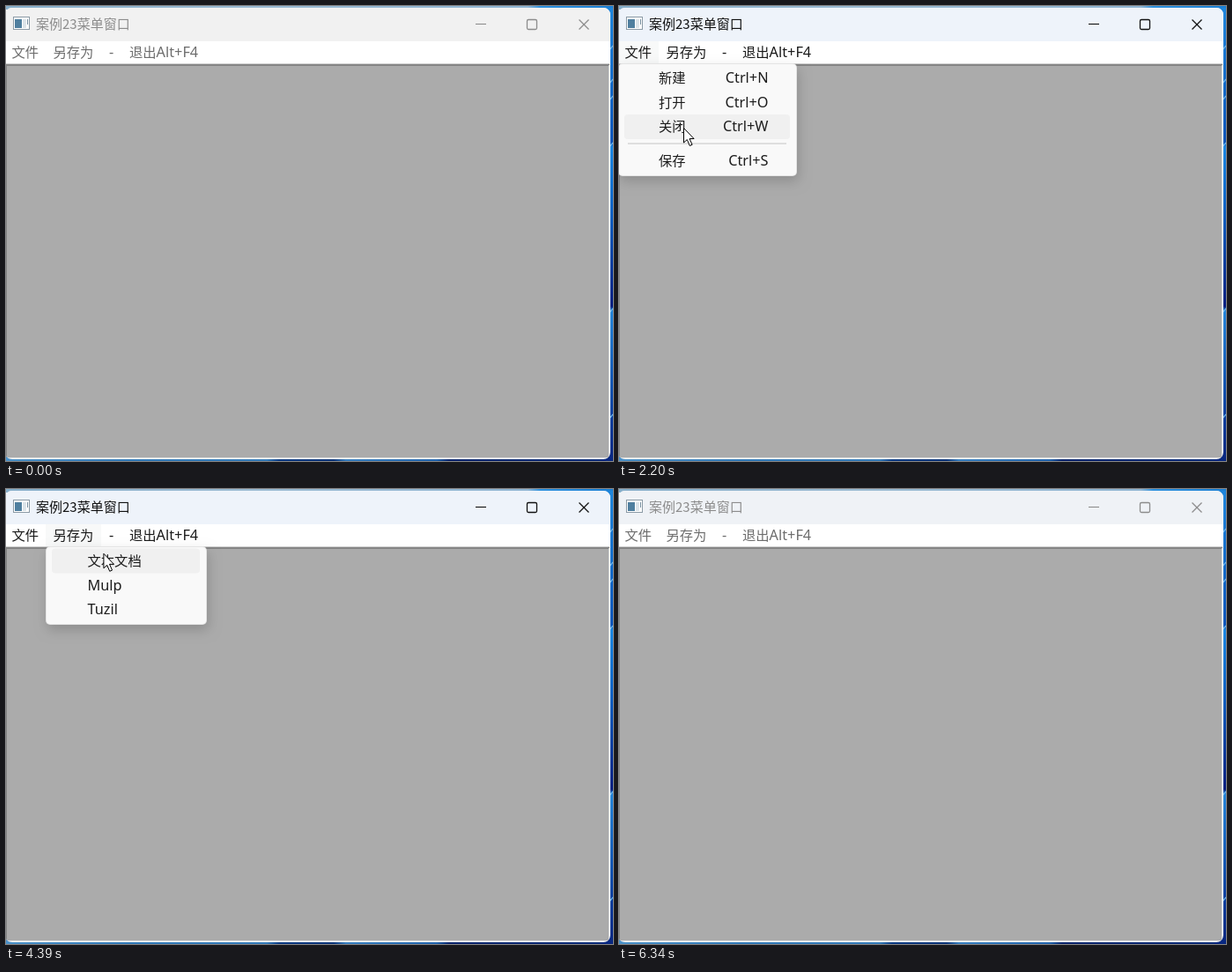
Write an HTML page with a canvas that moves like this. It is 689x516 px and loops after 6.4 s.

```html
<!DOCTYPE html>
<html lang="zh-CN">
<head>
<meta charset="utf-8">
<title>菜单窗口</title>
<style>
html, body { margin: 0; width: 100%; height: 100%; overflow: hidden; }
canvas { display: block; }
</style>
</head>
<body>
<canvas id="stage" width="689" height="516"></canvas>
<script>
const ctx = document.getElementById('stage').getContext('2d');
const LOOP = 6400;
const CJK = '"Noto Sans CJK SC", "Noto Sans CJK", sans-serif';
const LATIN = '"Noto Sans", "Open Sans", sans-serif';

// time, x, y of the pointer tip
const PATH = [
  [70, 571, 491], [680, 14, 46], [750, 13, 44], [1360, 13, 44],
  [2060, 73, 125], [2200, 73, 138], [2270, 73, 138], [2550, 74, 178],
  [2880, 74, 178], [3490, 61, 45], [3560, 61, 40], [3620, 61, 40],
  [3640, 61, 35], [3850, 61, 35], [4460, 112, 74], [4740, 123, 143],
  [4800, 123, 143], [4990, 151, 63], [5060, 151, 63], [5120, 152, 47],
  [5190, 154, 46], [5790, 616, 482], [5850, 617, 483], [5980, 645, 516]
];

const BAR = [
  { label: '文件', x: 6.5, left: 0, right: 45 },
  { label: '另存为', x: 53.5, left: 45, right: 108 },
  { label: '-', x: 117, left: 108, right: 131 },
  { label: '退出', tail: 'Alt+F4', x: 140, left: 131, right: 225 }
];

const MENUS = [
  {
    x: -1, w: 203, h: 128, from: 930, to: 3290, textX: 45, separator: 156,
    rows: [['新建', 81, 'Ctrl+N'], ['打开', 109, 'Ctrl+O'], ['关闭', 136.5, 'Ctrl+W'], ['保存', 175, 'Ctrl+S']]
  },
  {
    x: 45, w: 183, h: 89, from: 3360, to: 5080, textX: 92.5,
    rows: [['文本文档', 81], ['Mulp', 109], ['Tuzil', 136.5]]
  }
];

const clamp = v => Math.max(0, Math.min(1, v));
const mix = (a, b, k) => a + (b - a) * k;

function rect(x, y, w, h, color) {
  ctx.fillStyle = color;
  ctx.fillRect(x, y, w, h);
}

function roundBox(x, y, w, h, r, color) {
  ctx.beginPath();
  ctx.roundRect(x, y, w, h, r);
  ctx.fillStyle = color;
  ctx.fill();
}

function line(points, color, width) {
  ctx.beginPath();
  points.forEach(([x, y]) => ctx.lineTo(x, y));
  ctx.strokeStyle = color;
  ctx.lineWidth = width;
  ctx.stroke();
}

function text(str, x, middle, color, { align = 'left', size = 15.3 } = {}) {
  const latin = /^[\x20-\x7e]+$/.test(str);
  ctx.font = latin ? `${size + 1}px ${LATIN}` : `${size}px ${CJK}`;
  ctx.textAlign = align;
  ctx.fillStyle = color;
  ctx.fillText(str, x, middle + 5.5);
}

function pointerAt(t) {
  if (t < PATH[0][0] || t > PATH[PATH.length - 1][0]) return null;
  const i = Math.max(1, PATH.findIndex(p => p[0] >= t));
  const [t0, x0, y0] = PATH[i - 1], [t1, x1, y1] = PATH[i];
  const k = (1 - Math.cos(Math.PI * (t - t0) / (t1 - t0))) / 2;
  return { x: mix(x0, x1, k), y: mix(y0, y1, k) };
}

function gradient(x1, y1, stops) {
  const g = ctx.createLinearGradient(0, 0, x1, y1);
  stops.forEach(([at, color]) => g.addColorStop(at, color));
  return g;
}

function drawDesktop() {
  rect(0, 0, 689, 4, gradient(689, 0, [[0, '#86aeca'], [0.4, '#9bbbd3'], [0.86, '#8fb5d3'], [0.88, '#2d91df'], [1, '#1b7fd4']]));
  rect(676, 2, 13, 514, gradient(0, 516, [[0, '#1f86dc'], [0.3, '#0a55ba'], [0.31, '#1b87e2'], [0.45, '#0d62c4'], [0.66, '#041f80'], [0.67, '#2585d9'], [0.9, '#0b3f9f'], [1, '#07267f']]));
  rect(0, 504, 676, 12, gradient(689, 0, [[0, '#4a91c8'], [0.2, '#3179b8'], [0.43, '#347bb9'], [0.45, '#0b3a83'], [0.54, '#0c3478'], [0.56, '#377fc0'], [0.71, '#2164ad'], [0.73, '#08246c'], [1, '#0a2d7b']]));
  for (const y of [48, 86, 105, 158, 346, 466]) line([[684, y + 3], [689, y - 3]], '#6fb8ef', 1.2);
}

function drawWindow(t, pointer, open) {
  const active = t >= 890 && t < 6240;
  const tint = active ? clamp((t - 820) / 400) : t >= 6240 ? 0.6 : 0;
  const ink = active ? '#111' : '#8c8c8c';
  const barInk = active ? '#1a1a1a' : '#6d6d6d';

  roundBox(-1, 2, 687, 512, 8, '#f5f5f5');
  ctx.save();
  ctx.clip();
  rect(-1, 2, 687, 38, `rgb(${mix(241, 238, tint)},${mix(241, 243, tint)},${mix(241, 250, tint)})`);
  rect(-1, 40, 687, 26, '#fff');
  rect(0, 65, 685, 1, '#cfcfcf');
  rect(0, 66, 685, 1, '#858585');
  rect(0, 67, 685, 1, '#858585');
  rect(0, 68, 684, 444, '#ababab');
  rect(0, 66, 1, 446, '#858585');
  rect(684, 67, 1, 446, '#e3e3e3');
  rect(0, 512, 685, 1, '#e3e3e3');
  ctx.restore();

  rect(8, 12, 19, 15, '#8b9aa5');
  rect(9, 13, 17, 13, '#fff');
  rect(10, 15, 8, 10, '#4f7f9f');
  rect(19, 15, 4, 10, '#dce4e9');
  rect(24, 15, 1, 6, '#7890a0');
  text('案例23菜单窗口', 34, 20.5, ink, { size: 15 });

  line([[533, 20.5], [545, 20.5]], ink, 1.1);
  ctx.beginPath();
  ctx.roundRect(591.5, 15.5, 11, 11, 1.5);
  ctx.lineWidth = 1.3;
  ctx.stroke();
  line([[650.5, 15.5], [661.5, 26.5]], ink, 1.2);
  line([[661.5, 15.5], [650.5, 26.5]], ink, 1.2);

  const openIndex = MENUS.indexOf(open);
  BAR.forEach((item, i) => {
    const over = pointer && pointer.y >= 40 && pointer.y < 65 && pointer.x >= item.left && pointer.x < item.right;
    if (open ? i === openIndex : over) rect(item.left, 40, item.right - item.left, 25, '#f8f9f9');
    text(item.label, item.x, 52, barInk);
    if (item.tail) text(item.tail, item.x + 30.6, 52, barInk);
  });
}

function drawMenu(menu, t, pointer) {
  const age = t - menu.from;
  ctx.globalAlpha = age < 120 ? 0.24 : age < 165 ? 0.75 : 1;
  ctx.shadowColor = 'rgba(0,0,0,.17)';
  ctx.shadowBlur = 14;
  ctx.shadowOffsetX = 2;
  ctx.shadowOffsetY = 6;
  roundBox(menu.x, 65, menu.w, menu.h, 5, '#e4e4e4');
  ctx.shadowColor = 'transparent';
  roundBox(menu.x + 1, 66, menu.w - 2, menu.h - 2, 4, age < 400 && menu === MENUS[0] ? '#f6f6f6' : '#f9f9f9');
  if (menu.separator) rect(10, menu.separator - 1, 180, 2, '#dedede');

  for (const [label, y, shortcut] of menu.rows) {
    const over = pointer && Math.abs(pointer.y - y) < 13.8 && pointer.x > menu.x && pointer.x < menu.x + menu.w;
    if (over) roundBox(menu.x + 7, y - 13.5, menu.w - 15, 28, 4, '#f0f0f0');
    text(label, menu.textX, y, '#1c1c1c');
    if (shortcut) text(shortcut, 169.5, y, '#1c1c1c', { align: 'right' });
  }
  ctx.globalAlpha = 1;
}

function drawPointer({ x, y }) {
  ctx.save();
  ctx.translate(x + 0.5, y + 0.5);
  ctx.beginPath();
  [[0, 0], [0, 16.5], [3.8, 13], [6.8, 20], [9.6, 18.8], [6.6, 12], [11.6, 12]]
    .forEach(([px, py]) => ctx.lineTo(px, py));
  ctx.closePath();
  ctx.fillStyle = '#fff';
  ctx.fill();
  ctx.strokeStyle = '#000';
  ctx.lineWidth = 1;
  ctx.stroke();
  ctx.restore();
}

function draw(t) {
  const pointer = pointerAt(t);
  const open = MENUS.find(m => t >= m.from && t < m.to);
  drawDesktop();
  drawWindow(t, pointer, open);
  if (open) drawMenu(open, t, pointer);
  if (t >= 890 && t < 1050) {
    ctx.beginPath();
    ctx.arc(13, 44, 14.5, 0, Math.PI * 2);
    ctx.fillStyle = 'rgba(255,255,0,.52)';
    ctx.fill();
  }
  if (pointer) drawPointer(pointer);
}

const start = performance.now();
function tick() {
  draw((performance.now() - start) % LOOP);
  requestAnimationFrame(tick);
}
tick();
</script>
</body>
</html>
```
